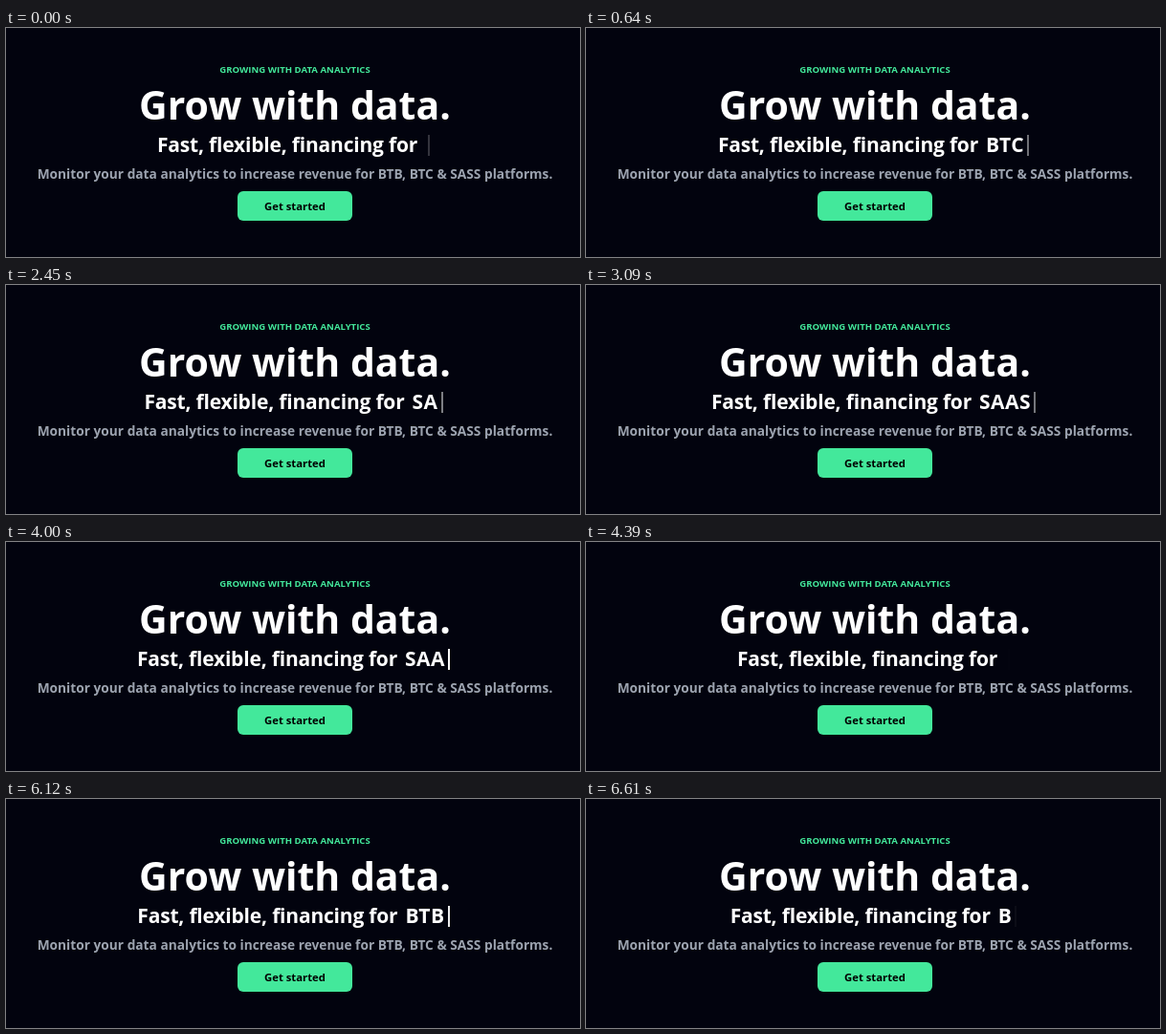
Recreate the animation shown at these times as an HTML page. Size 600 by 240 pixels, loop 6.64 s.

```html
<!DOCTYPE html>
<html lang="en">
<head>
<meta charset="utf-8">
<title>Grow with data</title>
<style>
  html, body {
    margin: 0;
    width: 100%;
    height: 100%;
    overflow: hidden;
    background: #02030e;
  }
  .stage {
    position: relative;
    width: 600px;
    height: 240px;
    overflow: hidden;
    font: bold 21px/24px "Open Sans", "Noto Sans", sans-serif;
    font-variant-ligatures: none;
    color: #fff;
  }
  svg { position: absolute; left: 0; top: 0; }
  text { text-anchor: middle; fill: #fff; }
  .tagline {
    position: absolute;
    left: 2px;
    top: 110px;
    width: 600px;
    height: 24px;
    display: flex;
    justify-content: center;
    white-space: pre;
  }
  .lead { letter-spacing: -.2px; }
  .word { letter-spacing: .5px; padding-left: 8px; }
  .cursor {
    width: 2px;
    height: 22px;
    margin: 2px 3px 0;
    background: #fff;
  }
</style>
</head>
<body>
<div class="stage">
  <svg width="600" height="240" viewBox="0 0 600 240">
    <text x="302" y="47" font-size="9.6" style="fill:#43e89b">GROWING WITH DATA ANALYTICS</text>
    <text x="302" y="96" font-size="41">Grow with data.</text>
    <text x="302" y="158" font-size="13.73" style="fill:#9ca3af">Monitor your data analytics to increase revenue for BTB, BTC &amp; SASS platforms.</text>
    <rect x="242" y="171" width="120" height="31" rx="6" fill="#43e89b"/>
    <text x="302" y="191" font-size="11.3" style="fill:#000">Get started</text>
  </svg>
  <div class="tagline"><span class="lead">Fast, flexible, financing for</span><span class="word"></span><span class="cursor"></span></div>
</div>
<script>
  const LOOP = 6640, BLINK = 700;
  const word = document.querySelector('.word');
  const cursor = document.querySelector('.cursor');

  // Times at which each letter is typed and then removed.
  const words = [
    { text: 'BTC', type: [150, 310, 470], erase: [1700, 1870, 2040] },
    { text: 'SAAS', type: [2220, 2370, 2520, 2660], erase: [3820, 4010, 4195, 4380] },
    { text: 'BTB', type: [4560, 4750, 4940], erase: [6235, 6435, 6640] }
  ];

  // Cursor stays solid just before erasing.
  const solid = [[1360, 1530], [3350, 3640], [5850, 6030]];

  // Blink runs: start time and the phase where the cursor vanishes.
  const runs = [[0, 175], [1530, 250], [2780, 195], [3640, 220], [6030, 290]];

  const count = (times, t) => times.filter(x => x <= t).length;

  function typed(t) {
    const w = words.find(w => t < w.erase[w.erase.length - 1]);
    return w ? w.text.slice(0, count(w.type, t) - count(w.erase, t)) : '';
  }

  // CSS "ease": cubic-bezier(.25, .1, .25, 1)
  function ease(x) {
    const bez = (a, b, s) => 3 * a * s * (1 - s) ** 2 + 3 * b * s * s * (1 - s) + s ** 3;
    let lo = 0, hi = 1;
    for (let i = 0; i < 20; i++) {
      const mid = (lo + hi) / 2;
      if (bez(.25, .25, mid) < x) lo = mid; else hi = mid;
    }
    return bez(.1, 1, lo);
  }

  function opacity(t) {
    if (solid.some(([a, b]) => t >= a && t < b)) return 1;
    const zero = runs.filter(r => r[0] <= t).pop()[1];
    const p = ((t - zero + BLINK) % BLINK) / BLINK * 2;
    return p < 1 ? ease(p) : 1 - ease(p - 1);
  }

  let start;
  function draw(now) {
    start ??= now;
    const t = (now - start) % LOOP;
    const text = typed(t);
    if (word.textContent !== text) word.textContent = text;
    cursor.style.opacity = opacity(t).toFixed(3);
    requestAnimationFrame(draw);
  }
  requestAnimationFrame(draw);
</script>
</body>
</html>
```
